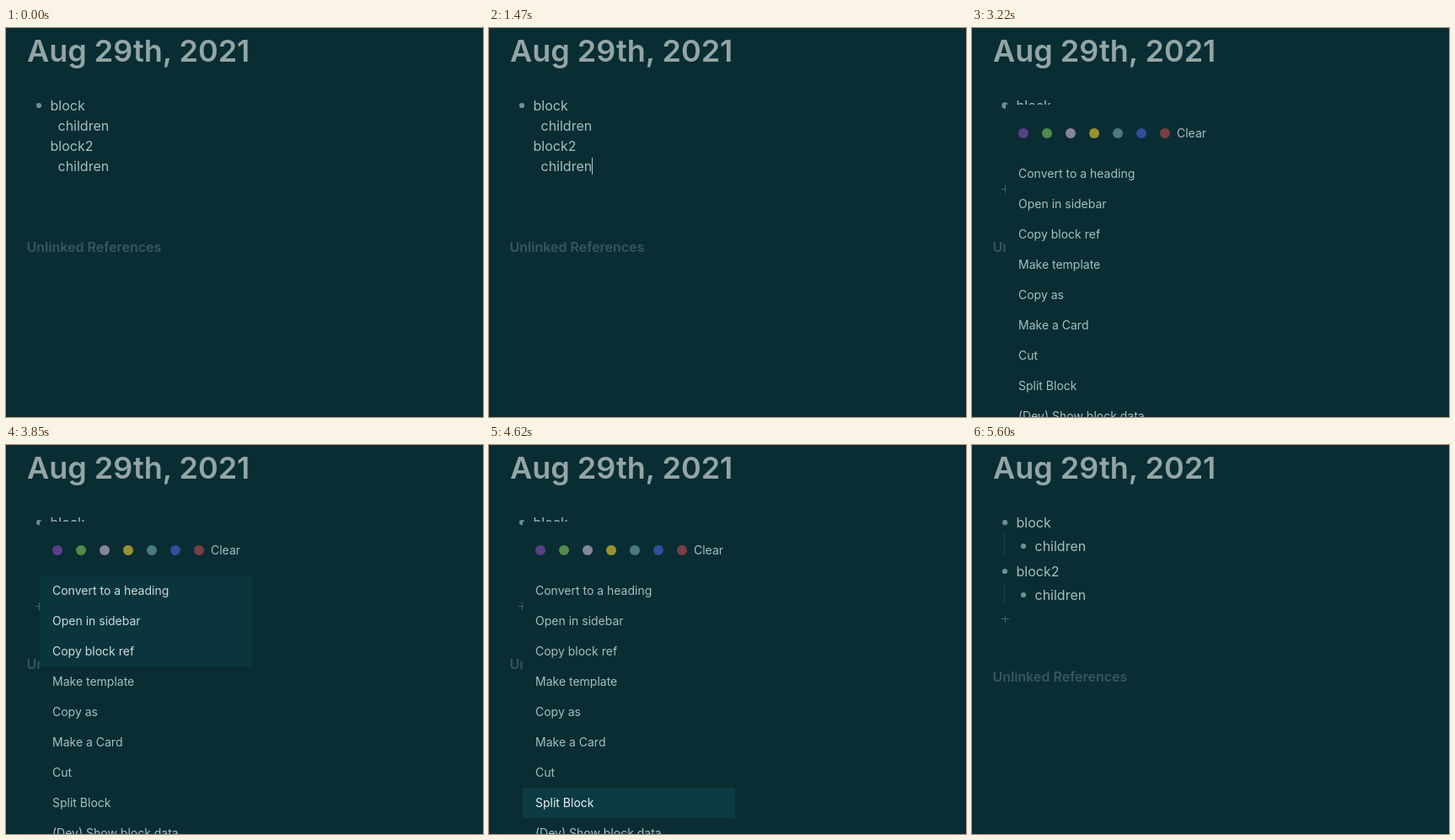
An HTML page for the animation above (7350 ms loop, 566 px wide and 462 px high).

```html
<!DOCTYPE html>
<html lang="en">
<head>
<meta charset="utf-8">
<title>Split block</title>
<style>
html, body { margin: 0; width: 100%; height: 100%; overflow: hidden; background: #092d33; }
svg { display: block; width: 566px; height: 462px; font: 16px Inter, sans-serif; fill: #a9bebf; }
.title { font-size: 36px; font-weight: 600; fill: #93a5a4; }
.refs { font-weight: 600; fill: #37575c; }
.dot { fill: #6f9191; }
.guide { stroke: #1d454b; }
.plus { stroke: #45666a; fill: none; }
.menu { font-size: 14px; }
.hot rect { fill: #0d3b43; }
.hot text { fill: #e6f0f0; }

.before, .after, .caret, .arrow, .bullet, .menu, .add, .hot {
  animation: 7350ms step-end infinite both;
}
.before { animation-name: before; }
.after { animation-name: after; }
.caret { animation-name: blink; }
.arrow { animation-name: arrow; }
.bullet { animation-name: bullet; transform-origin: 39px 92px; }
.menu { animation-name: menu; }
.add { animation-name: add; }
.pass { animation-name: pass; }
.cut { animation-name: cut; }
.split { animation-name: split; }

/* one 70 ms tick is 0.95238% of the loop */
@keyframes before { 0% { opacity: 1; } 76.19%, 100% { opacity: 0; } }
@keyframes after { 0% { opacity: 0; } 76.19%, 100% { opacity: 1; } }
@keyframes add { 0% { opacity: 0; } 43.809%, 100% { opacity: 1; } }
@keyframes menu { 0% { opacity: 0; } 43.809% { opacity: 1; } 75.238%, 100% { opacity: 0; } }
@keyframes blink {
  0% { opacity: 0; }
  20% { opacity: 1; }
  26.666% { opacity: 0; }
  34.285% { opacity: 1; }
  41.904%, 100% { opacity: 0; }
}
@keyframes arrow {
  0% { opacity: 0; }
  25.714% { opacity: 0; animation-timing-function: steps(5); }
  30.476% { opacity: 1; }
  43.809%, 100% { opacity: 0; }
}
@keyframes bullet {
  0% { transform: scale(1); }
  25.714% { transform: scale(1); animation-timing-function: steps(5); }
  30.476% { transform: scale(1.2); }
  43.809% { transform: scale(1.2); animation-timing-function: steps(2); }
  45.714%, 100% { transform: scale(1); }
}
@keyframes pass {
  0% { opacity: 0; }
  52.38% { opacity: .6; }
  53.333% { opacity: .4; }
  54.285% { opacity: .2; }
  55.238%, 100% { opacity: 0; }
}
@keyframes cut {
  0% { opacity: 0; }
  53.333% { opacity: 0; animation-timing-function: steps(3); }
  56.19% { opacity: 1; }
  60% { opacity: 1; animation-timing-function: steps(3); }
  62.857%, 100% { opacity: 0; }
}
@keyframes split {
  0% { opacity: 0; }
  60% { opacity: 0; animation-timing-function: steps(3); }
  62.857%, 100% { opacity: 1; }
}
</style>
</head>
<body>
<svg viewBox="0 0 566 462">
  <rect width="566" height="462" fill="#092d33"/>
  <text class="title" x="25" y="40">Aug 29th, 2021</text>
  <circle class="dot bullet" cx="39" cy="92" r="3.1"/>
  <text x="52.5" y="98">block</text>

  <g class="before">
    <path class="arrow" d="M22 89.5H32L27 94.5Z" fill="#58777a"/>
    <text x="61.5" y="122">children</text>
    <text x="52.5" y="146">block2</text>
    <text x="61.5" y="170">children</text>
    <rect class="caret" x="122" y="154" width="1" height="20" fill="#b4c4c4"/>
    <path class="plus add" d="M35 191.5h9M39.5 187v9"/>
    <text class="refs" x="24.5" y="266">Unlinked References</text>
  </g>

  <g class="after">
    <path class="guide" d="M38.5 104V132M38.5 163V190"/>
    <g class="dot">
      <circle cx="61" cy="120" r="3.1"/>
      <circle cx="39" cy="150" r="3.1"/>
      <circle cx="61" cy="178" r="3.1"/>
    </g>
    <text x="74.5" y="126">children</text>
    <text x="52.5" y="156">block2</text>
    <text x="74.5" y="184">children</text>
    <path class="plus" d="M35 206.5h9M39.5 202v9"/>
    <text class="refs" x="24.5" y="281">Unlinked References</text>
  </g>

  <g class="menu" id="menu">
    <rect x="40" y="91" width="252" height="371" fill="#092d33"/>
    <text x="243" y="130">Clear</text>
  </g>
</svg>
<script>
const menu = document.getElementById('menu');

function add(parent, tag, attrs, text = '') {
  const el = document.createElementNS('http://www.w3.org/2000/svg', tag);
  for (const key in attrs) el.setAttribute(key, attrs[key]);
  el.textContent = text;
  return parent.appendChild(el);
}

['#5a4088', '#528a4c', '#858696', '#9a9230', '#4b7a7b', '#304f9c', '#783f42']
  .forEach((fill, i) => add(menu, 'circle', { cx: 61 + 28 * i, cy: 125, r: 6, fill }));

const items = ['Convert to a heading', 'Open in sidebar', 'Copy block ref', 'Make template',
  'Copy as', 'Make a Card', 'Cut', 'Split Block', '(Dev) Show block data'];

items.forEach((label, i) => {
  const top = 155 + 36 * i;
  const pos = { x: 55, y: top + 23 };
  add(menu, 'text', pos, label);
  if (i > 7) return;
  // the pointer sweeps down the rows, rests on Cut, then moves to Split Block
  const kind = i < 6 ? 'pass' : i === 6 ? 'cut' : 'split';
  const delay = i > 2 && i < 6 ? 70 : 0;
  const hot = add(menu, 'g', { class: 'hot ' + kind, style: `animation-delay:${delay}ms` });
  add(hot, 'rect', { x: 40, y: top, width: 252, height: 36 });
  add(hot, 'text', pos, label);
});
</script>
</body>
</html>
```
